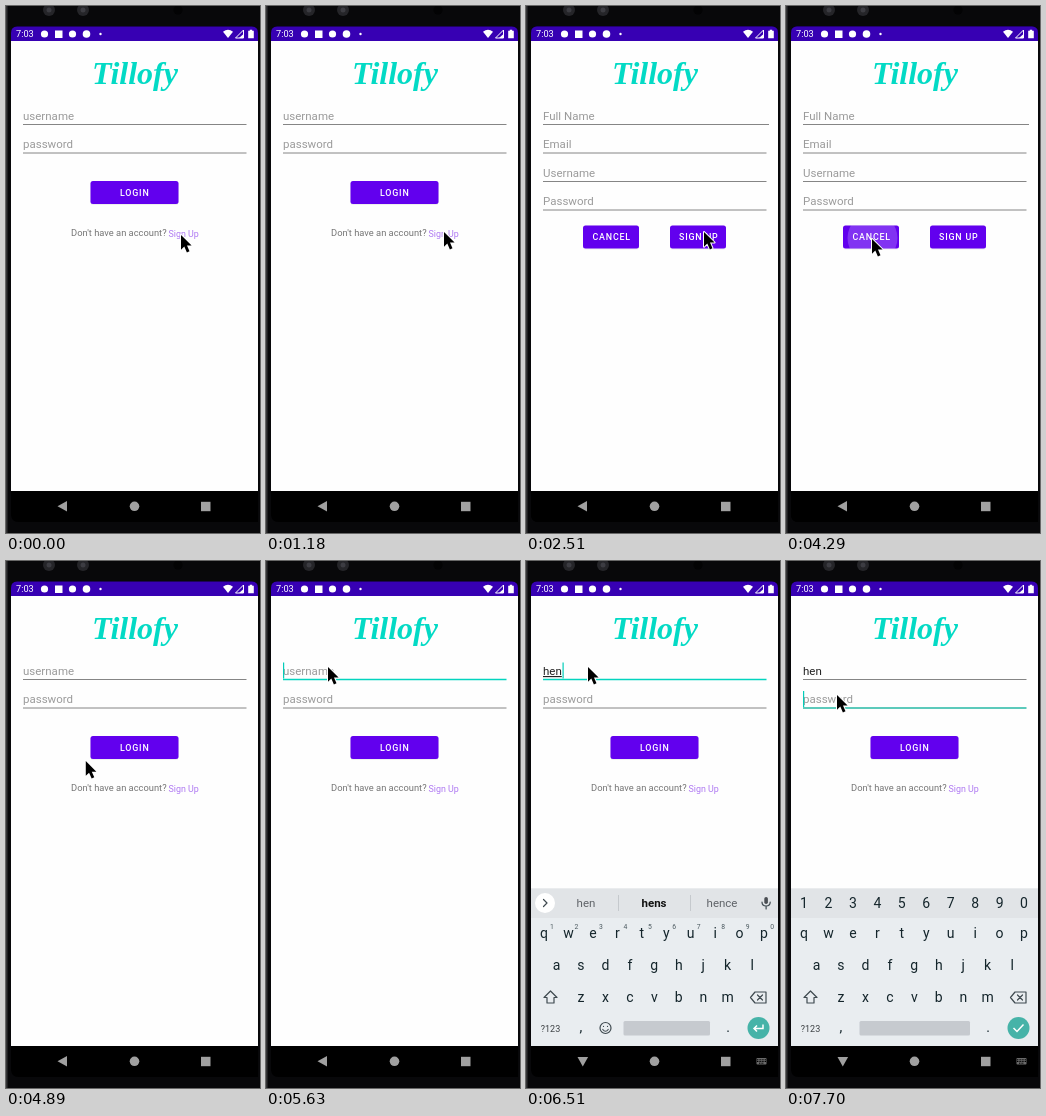
These frames come from a looping animation (254 by 527 pixels, 8 s). An HTML page:

```html
<!DOCTYPE html>
<html lang="en">
<head>
<meta charset="utf-8">
<title>Login and sign up</title>
<style>
  html, body { margin: 0; width: 100%; height: 100%; overflow: hidden; background: #08080a; }
  svg { display: block; width: 100%; height: 100%; font-family: Roboto, sans-serif; }
  .logo { font: italic bold 32px "Liberation Serif", serif; fill: #03dac5; text-anchor: middle; }
  .hint { font-size: 11.5px; fill: #9b9b9b; }
  .typed { font-size: 11.5px; fill: #222; }
  .line { stroke: #858585; stroke-width: 1; }
  .btn rect { fill: #6200ee; }
  .btn text { font-size: 8.9px; font-weight: 500; letter-spacing: .09em; fill: #fff; }
  .window { transform-origin: 129px 268px; }
  .key { font-size: 14px; fill: #14252b; text-anchor: middle; }
  .sup { font-size: 6.8px; fill: #4c5a60; text-anchor: middle; }
  .word { font-size: 11.5px; fill: #5f6368; text-anchor: middle; }
  .bold { font-weight: 700; fill: #111; }
  .stroke { fill: none; stroke: #3f4a50; stroke-width: 1.2; stroke-linejoin: round; stroke-linecap: round; }
</style>
</head>
<body>
<svg viewBox="0 0 254 527" preserveAspectRatio="none">
  <defs>
    <clipPath id="screen"><path d="M5 27Q5 20.5 11 20.5H246Q252 20.5 252 27V516H13Q5 516 5 508Z"/></clipPath>
    <clipPath id="board"><rect x="5" y="320" width="247" height="165"/></clipPath>
    <clipPath id="cancelClip"><rect x="57" y="219.5" width="56" height="23" rx="2.5"/></clipPath>
    <filter id="shade" x="-10%" y="-20%" width="120%" height="160%">
      <feDropShadow dx="0" dy=".5" stdDeviation=".5" flood-opacity=".12"/>
    </filter>
    <g id="frame">
      <rect x="5" y="20" width="248" height="496"/>
      <rect x="5" y="20" width="248" height="15.5" fill="#3700b3"/>
      <rect x="5" y="35" width="248" height="450" fill="#fefefe"/>
      <text class="logo" x="129" y="78">Tillofy</text>
    </g>
  </defs>

  <!-- phone body -->
  <rect width="254" height="527" fill="#08080a"/>
  <rect width="1.5" height="527" fill="#343436"/>
  <g fill="#252529">
    <circle cx="43" cy="4" r="6"/><circle cx="77" cy="4" r="6"/><circle cx="172" cy="4" r="4.5" fill="#030304"/>
  </g>
  <g fill="#3c3c42"><circle cx="43" cy="4" r="2.5"/><circle cx="77" cy="4" r="2.5"/></g>

  <g clip-path="url(#screen)">
    <g id="login" class="window">
      <use href="#frame"/>
      <text id="userHint" class="hint" x="17" y="114">username</text>
      <text id="user" class="typed" x="17" y="114"></text>
      <line id="userLine" class="line" x1="17" x2="240.5" y1="118.5" y2="118.5"/>
      <text class="hint" x="17" y="142">password</text>
      <line id="passLine" class="line" x1="17" x2="240.5" y1="147" y2="147"/>
      <rect id="caret" width="1.2" height="16" fill="#03cdb9"/>
      <g class="btn">
        <rect x="84.5" y="175" width="88" height="23" rx="2.5" filter="url(#shade)"/>
        <text x="114" y="190">LOGIN</text>
      </g>
      <text x="65" y="230" font-size="9.35" fill="#757575">Don't have an account?</text>
      <text x="162.5" y="230.5" font-size="8.9" fill="#ae78f2">Sign Up</text>
    </g>

    <g id="signup" class="window">
      <use href="#frame"/>
      <g id="fields"></g>
      <g class="btn">
        <rect x="57" y="219.5" width="56" height="23" rx="2.5" filter="url(#shade)"/>
        <g clip-path="url(#cancelClip)"><circle id="ripple" cx="86.5" cy="232" fill="#fff"/></g>
        <text x="66.5" y="234.3">CANCEL</text>
        <rect x="144" y="219.5" width="56" height="23" rx="2.5" filter="url(#shade)"/>
        <text x="153" y="234.3">SIGN UP</text>
      </g>
    </g>
  </g>

  <!-- status bar -->
  <g fill="#fff">
    <text x="10" y="31.3" font-size="9.2">7:03</text>
    <circle cx="38.5" cy="28" r="3.6"/>
    <rect x="49" y="24.5" width="7.5" height="7.5"/>
    <circle cx="66.5" cy="28" r="3.6"/>
    <circle cx="80.5" cy="28" r="3.8"/>
    <circle cx="94.5" cy="28" r="1.2"/>
    <path d="M217 25.7Q222 21.7 227 25.7L222 32Z"/>
    <path d="M237.5 24V32H229.5Z" fill="none" stroke="#fff"/>
    <path d="M237.5 28V32H233Z"/>
    <path d="M242.2 24.8H243.8V23.8H246.2V24.8H247.8V32.2H242.2Z"/>
  </g>

  <g clip-path="url(#board)">
    <g id="keyboard">
      <rect x="5" y="327.5" width="248" height="160" fill="#e9edf0"/>
      <rect x="5" y="327.5" width="248" height="29.5" fill="#e1e4e7"/>
      <g id="strip">
        <circle cx="19" cy="342" r="10" fill="#fff"/>
        <path class="stroke" d="M17.5 338.5L21 342L17.5 345.5"/>
        <path d="M92.5 334V350M164.5 334V350" stroke="#c5c9cd"/>
        <text class="word" x="60" y="346"></text>
        <text class="word bold" x="128" y="346"></text>
        <text class="word" x="196" y="346"></text>
        <rect x="238.3" y="336" width="3.6" height="7" rx="1.8" fill="#4a4e53"/>
        <path class="stroke" d="M236 341Q236 345 240.1 345Q244.2 345 244.2 341M240.1 345V348"/>
      </g>
      <g id="digits"></g>
      <g id="sups"></g>
      <g id="keys"></g>
      <path class="stroke" d="M24.5 430L31 436.5H28V442H21V436.5H18Z"/>
      <path class="stroke" d="M229 431H240V442H229L224.5 436.5ZM231.5 434L236.5 439M236.5 434L231.5 439"/>
      <text x="24.5" y="470.5" font-size="9" fill="#3c4043" text-anchor="middle">?123</text>
      <text class="key" x="55" y="471">,</text>
      <text class="key" x="202" y="471">.</text>
      <g id="emoji">
        <circle class="stroke" cx="79.5" cy="467" r="5.5"/>
        <path class="stroke" d="M76.8 468.5Q79.5 472 82.2 468.5M77.5 465.3V465.4M81.5 465.3V465.4"/>
      </g>
      <rect id="space" y="460" height="14.5" rx="1.5" fill="#c6cacf"/>
      <circle cx="232.5" cy="467" r="11" fill="#46b3a8"/>
      <path id="enterIcon" fill="none" stroke="#fff" stroke-width="1.5"/>
    </g>
  </g>

  <!-- navigation bar -->
  <g fill="#a0a0a0">
    <path id="back" d="M51.5 500.3L61 495V505.6Z"/>
    <circle cx="128.5" cy="500.3" r="4.8"/>
    <rect x="195" y="495.8" width="9.5" height="9.4"/>
    <g id="kbIcon" fill="#6a6a6a">
      <rect x="230.5" y="497" width="10" height="6.5" rx=".8"/>
      <path d="M231 498.8H240M231 500.5H240M233 502.2H238" stroke="#000" stroke-dasharray="1 .6"/>
    </g>
  </g>

  <path id="pointer" d="M0 0V14.7L3.3 11.6L5.9 17.4L8.5 16.2L6 10.6H10.6Z"
        stroke="#fff" stroke-width="2" stroke-linejoin="round" paint-order="stroke"/>
</svg>

<script>
const $ = id => document.getElementById(id);
const set = (el, attrs) => { for (const k in attrs) el.setAttribute(k, attrs[k]); };
const show = (id, on) => { $(id).style.display = on ? "" : "none"; };

const LOOP = 8000, STEP = 148.07, PITCH = 24.45;

function add(parent, tag, attrs, text = "") {
  const el = document.createElementNS("http://www.w3.org/2000/svg", tag);
  set(el, attrs);
  el.textContent = text;
  $(parent).append(el);
}

function row(parent, chars, x, y, cls = "key") {
  [...chars].forEach((c, i) => add(parent, "text", { class: cls, x: x + i * PITCH, y }, c));
}

["Full Name", "Email", "Username", "Password"].forEach((label, i) => {
  const y = 118.5 + i * 28.5;
  add("fields", "text", { class: "hint", x: 17, y: 114 + i * 28.3 }, label);
  add("fields", "line", { class: "line", x1: 17, x2: i ? 240.5 : 243, y1: y, y2: y });
});
row("digits", "1234567890", 18, 347);
row("sups", "1234567890", 26, 368, "sup");
row("keys", "qwertyuiop", 18, 377);
row("keys", "asdfghjkl", 30.5, 409);
row("keys", "zxcvbnm", 55, 441);

// pointer stops: step, x, y
const path = [
  [0, 175, 229], [1, 174, 233], [3, 148, 196], [4, 138, 187], [5, 140, 189],
  [7, 172, 235], [8, 178, 226], [17, 178, 226], [21, 87, 234], [22, 86, 233],
  [32, 86, 233], [35, 62, 106], [46, 62, 106], [49, 51, 134], [54, 51, 134]
];

function pointerAt(n) {
  const i = path.findIndex(p => p[0] > n);
  const [a, ax, ay] = path[i - 1], [b, bx, by] = path[i];
  const u = (n - a) / (b - a), e = u * u * (3 - 2 * u);
  return [ax + (bx - ax) * e, ay + (by - ay) * e];
}

// sign-up opacity, sign-up scale, login scale
function windowsAt(n) {
  if (n < 14) return [0, 1, 1];
  if (n < 17) return [[.6, .95, 1.04], [1, .985, 1.05], [1, .997, 1.05]][n - 14];
  if (n < 31) return [1, 1, 1];
  if (n < 33) return [[.45, .95, 1.04], [0, .9, 1.01]][n - 31];
  return [0, 1, 1];
}

const words = [["", "", ""], ["h", "he", "his"], ["he", "her", "hey"], ["hen", "hens", "hence"]];
const typed = "hen";

function setLine(id, color) {
  $(id).style.stroke = color;
  $(id).style.strokeWidth = color ? 1.5 : "";
}

function draw(n) {
  const [alpha, upScale, inScale] = windowsAt(n);
  $("signup").style.opacity = alpha;
  $("signup").style.transform = `scale(${upScale})`;
  $("login").style.transform = `scale(${inScale})`;
  const press = n === 29 || n === 30;
  set($("ripple"), { r: press ? 25 + 8 * (n - 29) : 0, opacity: n === 29 ? .2 : .1 });

  const count = Math.max(0, Math.min(typed.length, n - 41));
  const onUser = n >= 36 && n < 50, onPass = n >= 50;
  const user = $("user");
  user.textContent = typed.slice(0, count);
  user.style.textDecoration = onUser ? "underline" : "none";
  show("userHint", !count);
  setLine("userLine", onUser ? "#03d4be" : "");
  setLine("passLine", onPass ? "#26b8a4" : "");
  show("caret", n >= 37);
  const end = onUser && count ? user.getComputedTextLength() + .7 : 0;
  set($("caret"), { x: 17 + end, y: onPass ? 130 : 101.5 });

  const up = n >= 39, numeric = n >= 51;
  show("keyboard", up);
  set($("keyboard"), { transform: `translate(0 ${n === 39 ? 105 : n === 40 ? 24 : 0})` });
  show("kbIcon", up);
  set($("back"), { transform: up ? "rotate(-90 56.8 500.3)" : "" });
  show("strip", !numeric);
  show("sups", !numeric);
  show("emoji", !numeric);
  show("digits", numeric);
  set($("space"), numeric ? { x: 73.5, width: 110.5 } : { x: 97.5, width: 86.5 });
  set($("enterIcon"), { d: n >= 52 ? "M227.5 467L231 470.5L237.5 463.5"
    : "M237 463.5V467.5H228M231 464.5L228 467.5L231 470.5" });
  $("strip").querySelectorAll("text").forEach((el, i) => { el.textContent = words[count][i]; });

  const [x, y] = pointerAt(n);
  set($("pointer"), { transform: `translate(${x} ${y})` });
}

let last = -1;
function tick(now) {
  const n = Math.min(53, Math.floor((now % LOOP + 10) / STEP));
  if (n !== last) draw(last = n);
  requestAnimationFrame(tick);
}
draw(0);
requestAnimationFrame(tick);
</script>
</body>
</html>
```
